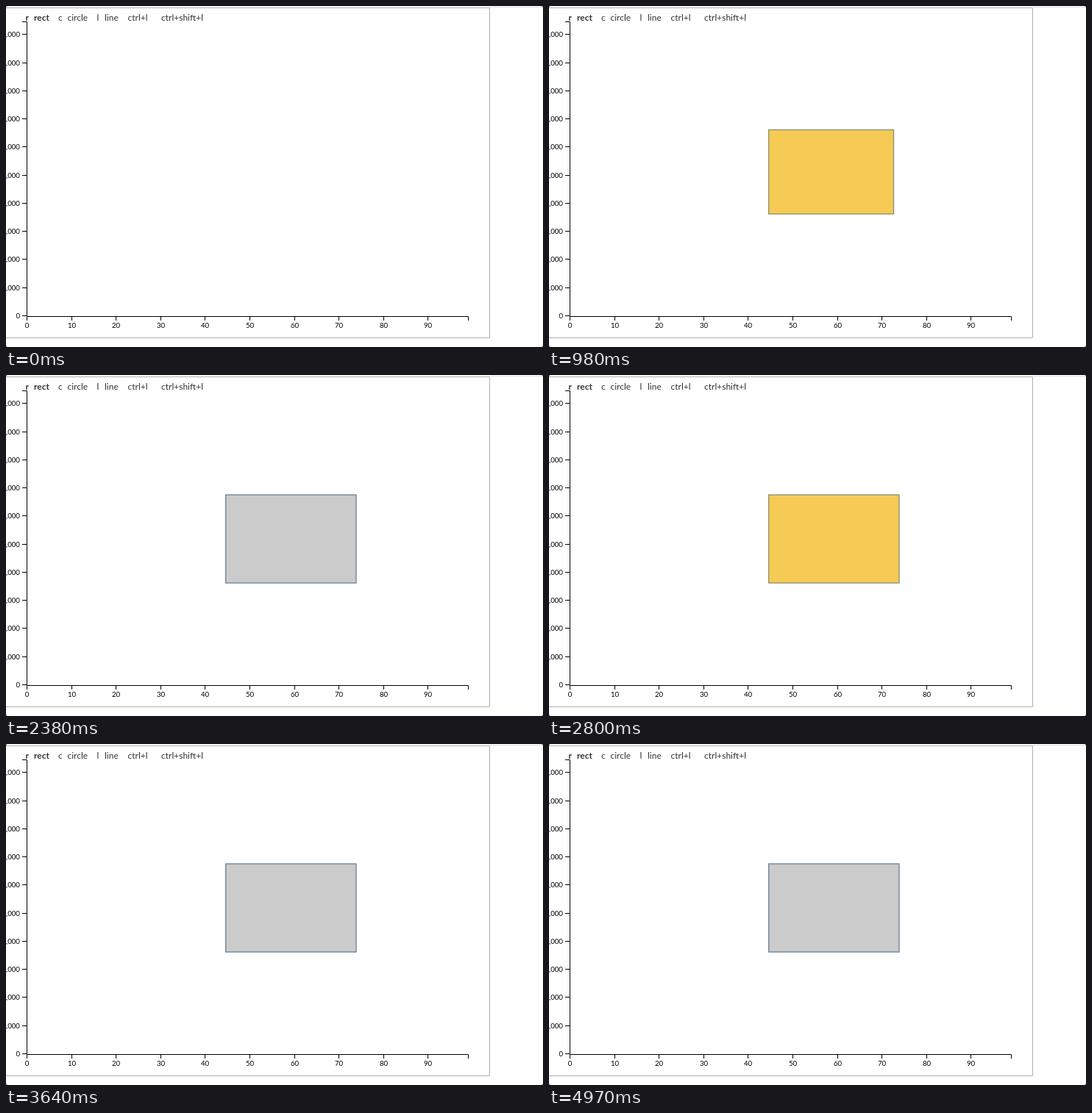
These frames come from a looping animation (730x464 px, 5530 ms). An HTML page:

```html
<!DOCTYPE html>
<html lang="en">
<head>
<meta charset="utf-8">
<title>Drawing a rectangle on a chart</title>
<style>
  html, body { margin: 0; width: 100%; height: 100%; overflow: hidden; background: #fff; }
  svg { display: block; font: 9.7px Lato, sans-serif; }
  .menu { font-size: 12px; fill: #333; }
  .bold { font-weight: bold; }
  .axis { fill: none; stroke: #000; }
  .border { fill: none; stroke: #b0b0b0; }
</style>
</head>
<body>
<svg width="730" height="464" viewBox="0 0 730 464">
  <path class="border" d="M0 2.5H657.5V451.5H0"/>
  <path d="M658 1.5H730" stroke="#ddd"/>
  <path d="M0 0h2L0 2zM730 0h-2l2 2zM0 464h2l-2-2zM730 464h-2l2-2z" fill="#777"/>
  <g id="axes">
    <path class="axis" d="M22 21.5H28.5V421.5H22M28.5 428V422.5H628.5V428"/>
  </g>
  <g class="menu">
    <text class="bold" x="26.5" y="20">r</text>
    <text class="bold" x="38" y="20">rect</text>
    <text x="71" y="20">c</text>
    <text x="83.5" y="20">circle</text>
    <text x="123.5" y="20">l</text>
    <text x="134" y="20">line</text>
    <text x="165.5" y="20">ctrl+l</text>
    <text x="211" y="20">ctrl+shift+l</text>
  </g>
  <rect id="shape" stroke-width="1.2"/>
</svg>
<script>
const LOOP = 5530, STEP = 70;
const LEFT = 298.7, BOTTOM = 283;
const SVG = "http://www.w3.org/2000/svg";
const axes = document.getElementById("axes");
const shape = document.getElementById("shape");

function add(tag, attributes, text = "") {
  const node = document.createElementNS(SVG, tag);
  for (const name in attributes) node.setAttribute(name, attributes[name]);
  node.textContent = text;
  axes.append(node);
}

for (let i = 0; i <= 10; i++) {
  const y = Math.round(421 - i * 38.27) + 0.5;
  add("path", { class: "axis", d: `M22 ${y}H28` });
  add("text", { x: 19, y: y + 3, "text-anchor": "end" }, (i * 1000).toLocaleString("en-US"));
}
for (let i = 0; i < 10; i++) {
  const x = Math.round(28 + i * 60.6) + 0.5;
  add("path", { class: "axis", d: `M${x} 422V428` });
  add("text", { x, y: 438, "text-anchor": "middle" }, i * 10);
}

// Dragged corner: [time, right, top]
const drag = [
  [70, 368, 234], [140, 437, 186], [630, 438, 185.7], [910, 453, 177],
  [980, 468.5, 168.5], [1260, 468, 169], [1470, 476, 163]
];
// Highlights: [on, fade start, fade end]
const highlights = [
  [70, 2310, 2380], [2800, 2870, 3150], [3430, 3430, 3640], [4340, 4690, 4970]
];
const YELLOW = [246, 203, 85], GREY = [203, 203, 203];
const YELLOW_EDGE = [126, 136, 112], GREY_EDGE = [91, 121, 148];

const mix = (a, b, k) => `rgb(${a.map((v, i) => Math.round(v + (b[i] - v) * k))})`;

function draw(now) {
  const t = Math.floor((now % LOOP) / STEP) * STEP;
  const corner = drag.findLast(([time]) => t >= time);
  shape.style.display = corner ? "" : "none";
  if (corner) {
    const [, right, top] = corner;
    const [, start, end] = highlights.findLast(([on]) => t >= on);
    const fade = Math.min(1, Math.max(0, (t - start) / (end - start)));
    shape.setAttribute("x", LEFT);
    shape.setAttribute("y", top);
    shape.setAttribute("width", right - LEFT);
    shape.setAttribute("height", BOTTOM - top);
    shape.setAttribute("fill", mix(YELLOW, GREY, fade));
    shape.setAttribute("stroke", mix(YELLOW_EDGE, GREY_EDGE, fade));
  }
}

const begin = performance.now();
function tick() {
  draw(performance.now() - begin);
  requestAnimationFrame(tick);
}
tick();
</script>
</body>
</html>
```
